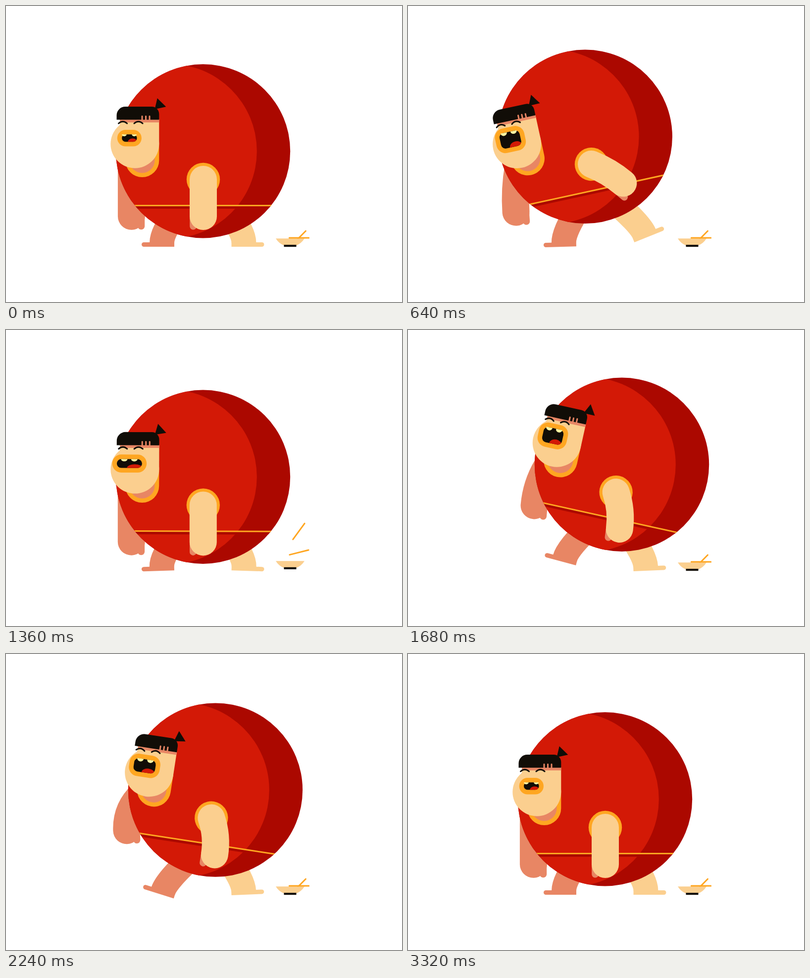
These frames come from a looping animation (800 px wide and 600 px high, 3.36 s). An HTML page:

```html
<!DOCTYPE html>
<html lang="en">
<head>
<meta charset="utf-8">
<title>Stomp</title>
<style>
  html, body { margin: 0; width: 100%; height: 100%; overflow: hidden; background: #fff; }
  svg { display: block; width: 100vw; height: 100vh; }
  .red { fill: #d31906; }
  .dark { fill: #ab0800; }
  .skin { fill: #fbcf8f; }
  .shade { fill: #e88664; }
  .orange { fill: #ffa621; }
  .black { fill: #110d07; }
  .tooth { fill: #fdf7a2; }
  .line { fill: none; stroke-linecap: round; stroke-width: 3; }
  .limb { fill: none; stroke-width: 55; stroke-linecap: round; }
  .leg { fill: none; stroke-width: 50; }
  .thumb { stroke: #e88664; stroke-width: 14; stroke-linecap: round; }
  .s-skin { stroke: #fbcf8f; }
  .s-shade { stroke: #e88664; }
  .s-orange { stroke: #ffa621; }
  .s-black { stroke: #110d07; }
</style>
</head>
<body>
<svg viewBox="0 0 800 600">
  <defs>
    <clipPath id="bellyClip"><circle cx="398" cy="294.3" r="176.2"/></clipPath>
    <clipPath id="mouthClip"><rect id="mouthHole"/></clipPath>
  </defs>

  <g id="bowl">
    <path id="stickHigh" class="line s-orange" d="M577.5 484.5L605.5 456"/>
    <g id="dish">
      <path class="skin" d="M545 471.3H603Q597 481 587 485H561Q551 481 545 471.3Z"/>
      <rect class="black" x="561.5" y="484" width="25" height="4.2"/>
    </g>
    <path id="stickLow" class="line s-orange" d="M572.3 470H611.7"/>
  </g>

  <path id="backArm" class="limb s-shade"/>
  <path id="backThumb" class="thumb" d="M19.8 0V20"/>

  <g>
    <path id="legL" class="leg s-shade"/>
    <path id="footL" class="shade" d="M25 0H-36.5a4.5 4.5 0 0 1 0-9H25Z"/>
  </g>
  <g transform="translate(795.5 0) scale(-1 1)">
    <path id="legR" class="leg s-skin"/>
    <path id="footR" class="skin" d="M25 0H-36.5a4.5 4.5 0 0 1 0-9H25Z"/>
  </g>

  <g id="belly">
    <circle class="dark" cx="398" cy="294.3" r="176.2"/>
    <g clip-path="url(#bellyClip)">
      <circle class="red" cx="329.8" cy="294.3" r="177"/>
      <g id="belt">
        <rect class="dark" x="200" y="405" width="400" height="6"/>
        <rect class="orange" x="200" y="403" width="400" height="3"/>
      </g>
    </g>
  </g>

  <g id="upper">
    <circle class="orange" cx="398.5" cy="351.5" r="33.7"/>
    <path class="orange" d="M241 280H309.3V313a34.1 34.1 0 0 1-68.2 0Z"/>
    <path class="shade" d="M249.5 280H300.5V313a25.5 25.5 0 0 1-51 0Z"/>
    <circle class="skin" cx="260.3" cy="279.7" r="49"/>
    <rect class="skin" x="230" y="230" width="79.3" height="50"/>
    <rect class="shade" x="230" y="229" width="79.3" height="7"/>
    <path id="knot" class="black" d="M305.7 187L323.3 204.3L300.5 209.3Z"/>
    <path class="black" d="M223.5 230.6V221.500a17.500 17.500 0 0 1 17.500-17.500H294.300a15 15 0 0 1 15 15V230.600Z"/>
    <path class="line s-shade" d="M275 223.500V231M282.500 223.500V231M290 223.500V231" style="stroke-linecap:round"/>
    <path class="line s-black" d="M227.500 238Q236 230.500 244.500 238M259 238Q267.500 230.500 276 238"/>
    <g transform="translate(249.3 267.8)">
      <rect id="lips" class="orange"/>
      <rect id="mouth" class="black"/>
      <g clip-path="url(#mouthClip)"><ellipse id="tongue" class="red"/></g>
      <path id="teeth" class="tooth"/>
    </g>
  </g>

  <path id="frontThumb" class="thumb" d="M-20.3 0V20"/>
  <path id="frontArm" class="limb s-skin"/>
</svg>
<script>
const LOOP = 3360, STEP = 40;
const CX = 398, CY = 294.3;
const RAD = Math.PI / 180;
const el = {};
document.querySelectorAll('[id]').forEach(node => el[node.id] = node);

// Monotone cubic interpolation: flat at extremes, smooth elsewhere.
function track(times, values) {
  const n = times.length;
  const slope = i => (values[i + 1] - values[i]) / (times[i + 1] - times[i]);
  const tangent = values.map((_, i) => {
    if (i === 0 || i === n - 1) return 0;
    const a = slope(i - 1), b = slope(i);
    return a * b <= 0 ? 0 : 2 * a * b / (a + b);
  });
  return t => {
    if (t <= times[0]) return values[0];
    if (t >= times[n - 1]) return values[n - 1];
    let i = 0;
    while (t >= times[i + 1]) i++;
    const d = times[i + 1] - times[i], u = (t - times[i]) / d, v = 1 - u;
    return values[i] * (1 + 2 * u) * v * v + tangent[i] * d * u * v * v
      + values[i + 1] * u * u * (3 - 2 * u) - tangent[i + 1] * d * u * u * v;
  };
}

const BEATS = [0, 360, 580, 920, 1140, 1360, 1680, 1900, 2240, 2460, 2760, LOOP];
const beat = (...values) => track(BEATS, values);

const pose = {
  x: beat(0, -35, -41, -24.5, 0, 0, 34, 43, 25, 0, 0, 0),
  y: beat(0, -23.2, -30, -18.2, 5, 3.4, -21.5, -30, -18.7, 5, 0, 0),
  tilt: beat(0, -10.4, -12.6, -6.9, 0, 0.2, 12.5, 14.5, 8.75, 0, 0, 0),
  knot: beat(0, 10, 11, 5, -4, 3, 13, 10, 5, -4, 4, 0),
  mouthW: beat(30.5, 38.5, 41, 44, 50, 51, 41, 41, 44, 50, 47, 30.5),
  mouthH: beat(15, 30, 32, 28, 20, 18, 31, 32, 27, 20, 18, 15),
  frontSwing: beat(0, 35, 58, 62, 10, 0, 5.5, 6, 5, 2, 0, 0),
  frontBend: beat(0, 0, 8, 13, 3, 0, 13, 15, 14, 3, 0, 0),
  backSwing: beat(0, -2.4, -3, -2.7, 0, 0, -19, -25, -23, -4, 0, 0),
  backBend: beat(0, -6.5, -7, -6, 0, 0, -14, -24, -25, -4, 0, 0),
  backLength: beat(102, 95, 93, 97, 102, 102, 90, 82, 81, 98, 102, 102),
  toeL: beat(0, -1.7, -1.5, -1.2, -2, -1.8, 15, 18, 17.7, -1, 0, 0),
  toeR: beat(0, 21, 22, 20.5, -2, -1.8, 2.5, 2.5, 2.5, -1, 0, 0),
  liftL: track([1360, 1520, 1680, 1900, 2240], [0, 3, 17.5, 22, 0]),
  liftR: track([0, 180, 360, 580, 920], [0, 1, 12.5, 20, 0])
};

const set = (node, attrs) => {
  for (const key in attrs) node.setAttribute(key, attrs[key]);
};
const move = (node, value) => node.setAttribute('transform', value);

// Angles for limbs are measured from straight down, positive to the right.
const along = (p, angle, length) =>
  [p[0] + Math.sin(angle * RAD) * length, p[1] + Math.cos(angle * RAD) * length];

function onBody(dx, dy, p) {
  const c = Math.cos(p.tilt * RAD), s = Math.sin(p.tilt * RAD);
  return [CX + p.x + dx * c - dy * s, CY + p.y + dx * s + dy * c];
}

function drawArm(arm, thumb, shoulder, swing, bend, length) {
  const elbow = along(shoulder, swing + bend, length / 2 / Math.cos(bend * RAD));
  const hand = along(shoulder, swing, length);
  arm.setAttribute('d', `M${shoulder}Q${elbow} ${hand}`);
  move(thumb, `translate(${hand}) rotate(${bend - swing})`);
}

function drawLeg(leg, foot, bodyY, lift, toe) {
  const heel = [315, 488 - lift];
  const ankle = along(heel, 180 - toe, 8);
  const knee = along(heel, 180 - toe, 32);
  const hip = [350 + 1.8 * Math.max(0, toe), 414 + 0.4 * bodyY - 0.85 * lift];
  leg.setAttribute('d', `M${ankle}Q${knee} ${hip}`);
  move(foot, `translate(${heel}) rotate(${toe})`);
}

function sizeRect(node, w, h, r) {
  set(node, { x: -w / 2, y: -h / 2, width: w, height: h, rx: r });
}

function drawMouth(w, h) {
  const r = Math.min(9, h / 2), lip = 18.6;
  sizeRect(el.mouth, w, h, r);
  sizeRect(el.mouthHole, w, h, r);
  sizeRect(el.lips, w + lip, h + lip, r + lip / 2);
  set(el.tongue, { cx: w * 0.21, cy: h / 2, rx: w * 0.31, ry: 4 + h * 0.19 });
  const rx = Math.min(6.5, w * 0.16), ry = Math.min(6, h * 0.26);
  const tooth = x => `M${x - rx} ${-h / 2}a${rx} ${ry} 0 0 0 ${2 * rx} 0Z`;
  el.teeth.setAttribute('d', tooth(-10.5) + tooth(9.8));
}

function drawBowl(t) {
  const since = t >= 2240 ? t - 2240 : t - 880;
  const phase = (start, duration) =>
    Math.min(1, Math.max(0, (since - start) / duration));
  const hop = (u, height) => -4 * height * u * (1 - u);
  const dish = phase(40, 500), low = phase(0, 600), high = phase(30, 740);
  move(el.dish, `translate(0 ${hop(dish, 7.5)})`);
  move(el.stickLow,
    `translate(0 ${hop(low, 30)}) rotate(${-24 * Math.sin(Math.PI * low)} 592 470)`);
  move(el.stickHigh,
    `translate(0 ${hop(high, 65)}) rotate(${-9 * Math.sin(Math.PI * high)} 591.5 470.3)`);
}

function render(t) {
  const p = {};
  for (const key in pose) p[key] = pose[key](t);

  move(el.belly, `translate(${p.x} ${p.y})`);
  move(el.belt, `rotate(${p.tilt} ${CX} ${CY})`);
  move(el.upper, `translate(${p.x} ${p.y}) rotate(${p.tilt} ${CX} ${CY})`);
  move(el.knot, `rotate(${p.knot} 301 207)`);
  drawMouth(p.mouthW, p.mouthH);

  drawArm(el.backArm, el.backThumb, onBody(-144.6, 30, p),
    p.backSwing, p.backBend, p.backLength);
  drawArm(el.frontArm, el.frontThumb, onBody(0.5, 57.2, p),
    p.frontSwing, p.frontBend, 75);
  drawLeg(el.legL, el.footL, p.y, p.liftL, p.toeL);
  drawLeg(el.legR, el.footR, p.y, p.liftR, p.toeR);
  drawBowl(t);
}

const begin = performance.now();
function tick() {
  const t = (performance.now() - begin) % LOOP;
  render(Math.floor(t / STEP) * STEP);
  requestAnimationFrame(tick);
}
tick();
</script>
</body>
</html>
```
